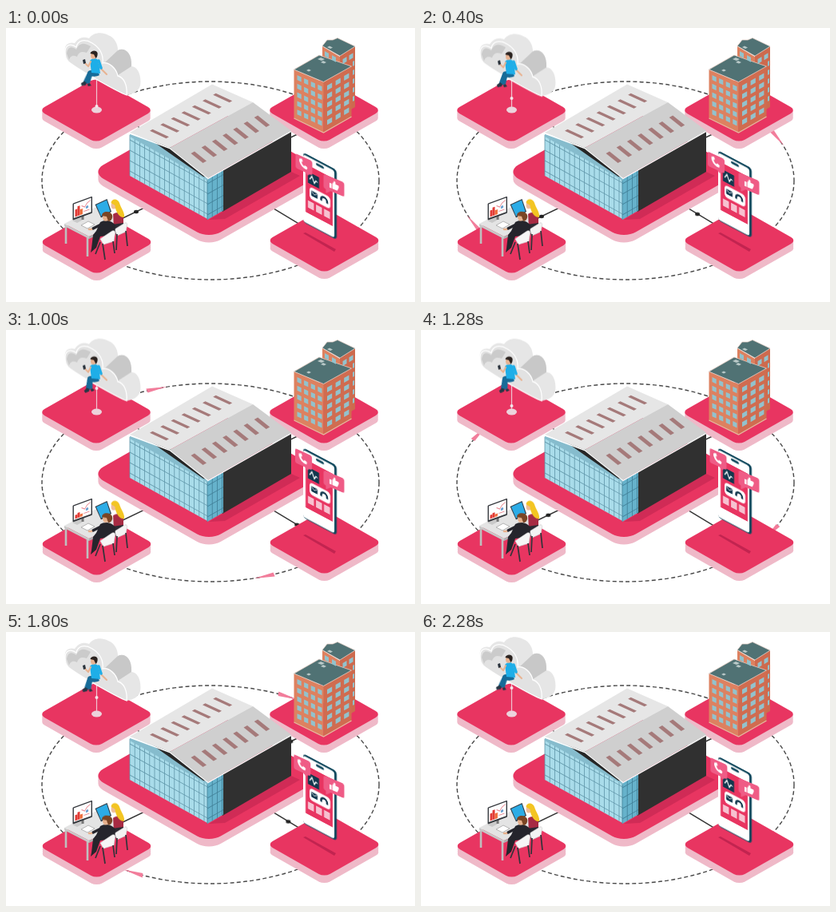
An HTML page for the animation above (2320 ms loop, 512 px wide and 343 px high).

```html
<!DOCTYPE html>
<html lang="en">
<head>
<meta charset="utf-8">
<title>Connected campus</title>
<style>
html, body { margin: 0; width: 100%; height: 100%; overflow: hidden; background: #fff; }
svg { display: block; width: 100vw; height: 100vh; }

.spark {
  fill: #f27d9b;
  offset-path: path("M467 191A211 124 0 0 0 45 191A211 124 0 0 0 467 191");
  offset-rotate: auto;
  animation: orbit 2320ms -2046ms linear infinite;
}
.spark.b { animation-delay: -886ms; }
@keyframes orbit { from { offset-distance: 0%; } to { offset-distance: 100%; } }

.bead { animation: travel 1160ms linear infinite; }
.bead.late { animation: travel 1160ms linear infinite, appear 1160ms linear infinite; }
@keyframes travel { to { transform: translate(var(--dx), var(--dy)); } }
@keyframes appear { 0%, 12% { opacity: 0; } 25%, 100% { opacity: 1; } }

.bob { animation: bob 1160ms cubic-bezier(.37, 0, .63, 1) infinite alternate; }
@keyframes bob { to { transform: translate(0, var(--dy)); } }

.sway { animation: sway 2320ms ease-in-out infinite; }
@keyframes sway {
  0%, 31%, 69%, 100% { transform: translateX(0); }
  17%, 84% { transform: translateX(-3.5px); }
  55% { transform: translateX(-1px); }
}
.shin { transform-origin: 104px 57px; animation: shin 1160ms cubic-bezier(.37, 0, .63, 1) infinite alternate; }
@keyframes shin { from { transform: rotate(5deg); } to { transform: rotate(-12deg); } }

.bars rect { transform-box: fill-box; transform-origin: 50% 100%; animation: bars 1160ms ease-in-out infinite alternate; }
@keyframes bars { to { transform: scaleY(.5); } }
</style>
</head>
<body>
<svg viewBox="0 0 512 343" preserveAspectRatio="none">
  <!-- orbit and links -->
  <ellipse cx="256" cy="191" rx="211" ry="124" fill="none" stroke="#484848" stroke-width="1.4" stroke-dasharray="5 3.2"/>
  <path class="spark" d="M-13 0L12-2.8 13 2.6z"/>
  <path class="spark b" d="M-13 0L12-2.8 13 2.6z"/>
  <path d="M113 92L398 264M113 254L398 117" stroke="#333" stroke-width="1.4"/>
  <g fill="#222">
    <ellipse class="bead" style="--dx:-35px;--dy:17px" cx="163" cy="230" rx="3" ry="2.2"/>
    <ellipse class="bead late" style="--dx:35px;--dy:21px" cx="334" cy="225.7" rx="3" ry="2.2"/>
    <ellipse class="bead late" style="--dx:35px;--dy:-17px" cx="337" cy="146.5" rx="3" ry="2.2"/>
  </g>

  <g id="pads"></g>

  <!-- hall -->
  <path d="M254 240L357 180 368 185 274 239z" fill="#d02b56"/>
  <path d="M271 178L357 129V180L271 230z" fill="#303030"/>
  <g id="glass"></g>
  <path d="M155 132L205 148 253 187 253 191 155 136z" fill="#86bccd"/>
  <path d="M184 142L205 148 253 187 247 186 211 161z" fill="#262626"/>
  <path d="M155 131L258 70.5 309 93 205 150z" fill="#e6e6e6"/>
  <path d="M205 150L309 93 357 128.5 253 188z" fill="#cfcfcf"/>
  <path d="M155 132L205 150.5 253 188.5 357 129.5" fill="none" stroke="#fff" stroke-width="1.4"/>
  <g id="slats" fill="#a57a7a"></g>

  <!-- office block -->
  <g>
    <path d="M396 23L418 36V100L396 88z" fill="#dd8160"/>
    <path d="M418 35L437 23V99L418 110z" fill="#cd6a4e"/>
    <path d="M396 22.500L402 15H409L415 12.500 437 23 418 35z" fill="#507274" stroke="#e6cfc4" stroke-width=".7"/>
    <path d="M360.500 52L397.500 68V131L360.500 113z" fill="#dd8160"/>
    <path d="M397.500 68L432.500 48V111L397.500 131z" fill="#d06c50"/>
    <path d="M360.500 52L392 34 432.500 48 397.500 67.500z" fill="#507274" stroke="#e6cfc4" stroke-width=".8"/>
    <path d="M360.500 113L397.500 131 432.500 111" fill="none" stroke="#e6b9a0" stroke-width="1.200"/>
    <path d="M390 39l4-2 5 2-4 2zM394 43l3-2 4 2-3 1.500zM402 24l3-1.500 4 2-3 1.500zM376 53l3-1.500 3 1.500-3 1.500z" fill="#b9c9c8"/>
    <g id="panes" fill="#93c2cc"></g>
  </g>

  <!-- cloud -->
  <path d="M113.500 62V102" stroke="#efc5d1" stroke-width="1.200"/>
  <ellipse cx="113.500" cy="102.500" rx="6.500" ry="4" fill="#ecd3dc"/>
  <circle class="bead" style="--dx:0px;--dy:-29px" cx="113.500" cy="98" r="2" fill="#f4e6eb"/>
  <g class="bob" style="--dy:4.800px">
    <path d="M74 30C72 20 80 17 86 19 92 10 100 11 104 13 110 5 120 5 128 9 136 12 140 20 140 28 148 24 158 30 157 48 165 48 170 60 168 72 166 80 158 83 151 84 140 80 90 52 78 42 74 38 74 34 74 30z" fill="#e6e6e6"/>
    <path d="M140 28C148 24 158 30 157 48L140 59C138 50 132 44 124 43z" fill="#c8c8c8"/>
    <path d="M74 30C74 22 80 18 88 24 90 14 100 14 108 19 118 25 122 34 121 44 128 42 138 50 140 60 148 62 152 72 151 84 140 80 90 52 78 42 74 38 74 34 74 30z" fill="#e2e2e2" stroke="#fff" stroke-width="1.300"/>
    <path d="M76 32C77 24 82 22 88 27 91 18 99 18 106 23L101 31C95 29 91 30 89 36 83 33 80 36 79 40z" fill="#cbcbcb"/>
    <!-- sitter -->
    <g class="shin">
      <path d="M103 54l6 1-3 14-4 1zM98 67l4-11 5 1-5 13-4 0z" fill="#176b98"/>
      <path d="M95 70l4-3 3 2-1 3-5 1zM103 70l3-1 2 3-4 1z" fill="#263645"/>
    </g>
    <path d="M102 56C103 52 108 52 115 54L117 59C112 62 107 60 103 60z" fill="#176b98"/>
    <path d="M105 41C108 37 113 37 116 41L118 57 107 56z" fill="#1eaee8"/>
    <path d="M106 42L103 48 99 44M116 43L120 52 126 58" fill="none" stroke="#e8b392" stroke-width="2" stroke-linecap="round" stroke-linejoin="round"/>
    <path d="M116 41L119 50" stroke="#1eaee8" stroke-width="3.500" stroke-linecap="round"/>
    <path d="M96 40l3-1 1 5-3 1z" fill="#29323c"/>
    <ellipse cx="109.500" cy="34.500" rx="3.500" ry="4.300" fill="#e8b392"/>
    <path d="M105.500 32C106 28 113 27 114.500 31 115 34 114 37 112.500 38L110 33z" fill="#2b2320"/>
  </g>

  <!-- desk -->
  <g>
    <path d="M75 247V270M102 260V286M112 250V262" stroke="#bfbfbf" stroke-width="2.600"/>
    <path d="M73 245L113 224 146 242 104 261z" fill="#e4e4e4"/>
    <path d="M73 245L104 261V264L73 248z" fill="#c8c8c8"/>
    <path d="M104 261L146 242V245L104 264z" fill="#b0b0b0"/>
    <path d="M94 247l9-5 8 4-9 5z" fill="#fff" stroke="#9a9a9a" stroke-width=".7"/>
    <path d="M83 241l9-5 6 3-9 5z" fill="#c9c9c9"/>
    <path d="M96 235v5" stroke="#777" stroke-width="3"/>
    <g transform="matrix(1 -.36 0 1 83.500 219.500)">
      <rect width="24.500" height="21" rx="1" fill="#33363b"/>
      <rect x="1.400" y="1.400" width="21.700" height="17.600" fill="#fff"/>
      <g class="bars" fill="#e23a35">
        <rect x="3" y="9" width="3" height="9"/>
        <rect x="6" y="6" width="3" height="12"/>
        <rect x="9" y="11" width="3.500" height="7" fill="#ee6a37"/>
      </g>
      <path d="M11 7l4 3 3-4 4-2M14 15h7" fill="none" stroke="#e88a94" stroke-width="1"/>
      <circle cx="18" cy="11" r="1.700" fill="#6a9fd0"/>
    </g>
    <path d="M111.500 221L126.500 214 132 230 119 237.500z" fill="#34404b"/>
    <path d="M113 221.500L126 215.500 130.500 229.500 119 235.500z" fill="#2cace6"/>
    <!-- far sitter -->
    <g class="bob" style="--dy:-.8px">
      <path d="M134 233C139 229 146 231 147 237L147 249 135 250z" fill="#a72b43"/>
      <ellipse cx="135" cy="222" rx="3.500" ry="4.500" fill="#efbd98"/>
      <path d="M131.500 219C132 213 140 213 142 219 144 226 149 231 148 237 142 238 137 230 136.500 222z" fill="#f3c522"/>
    </g>
    <path d="M133 246L147 244 147 253 138 260z" fill="#2c2a33"/>
    <path d="M136 252L149 244Q152 243 151.500 247L150 255 139 260z" fill="#f3f3f3" stroke="#d2d2d2" stroke-width=".7"/>
    <path d="M139 258l-1 20M150 254l2 19" stroke="#33333a" stroke-width="1.700"/>
    <!-- near sitter -->
    <path d="M118 243C124 239 133 241 137 247L136 259 118 261 113 275 106 281 107 276 109 259 113 254z" fill="#25252c"/>
    <path d="M119 246L109 251" stroke="#25252c" stroke-width="3.500" stroke-linecap="round"/>
    <path d="M107 252h-3" stroke="#e6b08c" stroke-width="2.500" stroke-linecap="round"/>
    <g class="bob" style="--dy:-.8px">
      <ellipse cx="125" cy="237" rx="4" ry="4.800" fill="#e6b08c"/>
      <path d="M120 235C120 229 130 228 133 234 134 239 131 242 128 242L126 236z" fill="#7a4524"/>
    </g>
    <path d="M118 264L133 254Q137 253 136.500 257L135 267 122 271z" fill="#f6f6f6" stroke="#d2d2d2" stroke-width=".7"/>
    <path d="M121 270l3 20M134 267l2 15M118 268l-6 15" stroke="#33333a" stroke-width="1.700"/>
  </g>

  <!-- phone -->
  <path d="M372 257L375 256 413 277 411 280z" fill="#c22450"/>
  <g class="bob" style="--dy:-8.500px">
    <g transform="matrix(1 .53 0 1 373 156)">
      <rect x="-1" width="42" height="87.500" rx="4" fill="#0e465b"/>
      <rect x="-1" y="2.500" width="39" height="84" rx="3" fill="#fff"/>
      <rect x="2" y="13" width="34" height="60" fill="#e83561"/>
      <rect x="15" y="4.500" width="10" height="3" rx="1.500" fill="#0e465b"/>
      <rect x="5" y="21" width="14" height="14" fill="#12384e"/>
      <path d="M7 29.500l3-5 3 7 2-4 2 1" fill="none" stroke="#fff" stroke-width="1.300"/>
      <rect x="7" y="38.500" width="26" height="15" rx="4" fill="#fff"/>
      <rect x="9" y="42.500" width="8" height="6.500" rx="1" fill="#12384e"/>
      <path d="M9.500 43.500l3.500 2.500 3.500-2.500" fill="none" stroke="#fff" stroke-width=".8"/>
      <path d="M21.500 48.500V46.500A3.700 3.700 0 0 1 29 46.500V48.500" fill="none" stroke="#12384e" stroke-width="2.400"/>
      <g fill="#f7c1d0">
        <rect x="5" y="57" width="7.500" height="9"/>
        <rect x="15" y="57" width="7.500" height="9"/>
        <rect x="25" y="57" width="7.500" height="9"/>
      </g>
    </g>
  </g>
  <g class="bob" style="--dy:-9.500px">
    <g class="sway">
      <g transform="matrix(1 .46 0 1 362.500 157)">
        <path d="M2 0H18Q21 0 21 3V16Q21 18 19 18H18L15 20.500 12 18H2Q0 18 0 16V2Q0 0 2 0z" fill="#ef5c86"/>
        <path d="M5 4C3 8 8 15 14 14L15 11 12 9.500 10.500 11C8.500 10 7.500 8.500 7.500 7L9 6 8 3z" fill="#fff"/>
      </g>
    </g>
  </g>
  <g class="bob" style="--dy:-7.500px">
    <g transform="matrix(1 .42 0 1 397.500 182.500)">
      <path d="M3 0H23Q26 0 26 3V16Q26 18 24 18H9L3 23V18Q0 18 0 15V3Q0 0 3 0z" fill="#ef5c86"/>
      <path d="M7.500 8h2.500v6H7.500zM11 8L13.500 3.500Q15.500 3.500 15 7H18.500Q19.500 8 19 9.500L17.500 13.500Q17 14 15.500 14H11z" fill="#fff"/>
    </g>
  </g>
</svg>
<script>
const fill = (id, markup) => { document.getElementById(id).innerHTML = markup; };
const times = (n, fn) => Array.from({ length: n }, (_, i) => fn(i)).join("");

// Rounded square seen isometrically: centre, side, corner radius
const tile = (x, y, size, r, color) =>
  `<rect x="${-size / 2}" y="${-size / 2}" width="${size}" height="${size}" rx="${r}" fill="${color}"` +
  ` transform="matrix(.866 .493 -.866 .493 ${x} ${y})"/>`;
const pad = ([x, y, size, r]) =>
  times(4, i => tile(x, y + 9.5 - i * 2.5, size, r, "#efb9c8")) + tile(x, y, size, r, "#e83561");
fill("pads", [
  [254, 180, 170, 17], [113, 103, 83, 8], [398, 103, 83, 8],
  [113.5, 268, 83, 8], [398.5, 266, 83, 8]
].map(pad).join(""));

// Curtain wall with mullions every `gap` pixels
const wall = (x, y, slope, w, gap, color, line) =>
  `<g transform="matrix(1 ${slope} 0 1 ${x} ${y})" stroke="${line}" stroke-width=".8">` +
  `<rect width="${w}" height="51" fill="${color}" stroke="none"/>` +
  `<path d="${times(Math.floor(w / gap) + 1, i => `M${i * gap} 0v51`)}"/>` +
  `<path d="${times(4, i => `M0 ${6 + i * 13}h${w}`)}"/></g>`;
fill("glass",
  wall(155, 134, .555, 98, 6.2, "#a9dcea", "#6096a9") +
  wall(252, 189, -.57, 20, 6.2, "#66b2cb", "#407f97"));

fill("slats", times(7, i => {
  const x = i * 13.2, y = i * 7.5;
  return `<path d="M${180 + x} ${128.8 - y}l3.500-2 20.500 9.500-3.500 2z"/>` +
    `<path d="M${231.5 + x} ${157 - y}l4.500-2.600 15 12-4.500 2.600z"/>`;
}));

const panes = (x, y, slope, cols, rows, dx, dy, w) =>
  `<g transform="matrix(1 ${slope} 0 1 ${x} ${y})">` +
  times(cols * rows, i => `<rect x="${(i % cols) * dx}" y="${Math.floor(i / cols) * dy}" width="${w}" height="6"/>`) + "</g>";
fill("panes",
  panes(364.5, 59, .46, 4, 5, 8.6, 10.8, 5.2) +
  panes(402, 72, -.57, 3, 5, 10.6, 10.8, 6.2) +
  panes(399, 29, .56, 2, 1, 9, 10, 5) +
  panes(421.5, 39, -.6, 2, 1, 8, 10, 5) +
  panes(434, 42, -.6, 1, 5, 8, 11, 2));
</script>
</body>
</html>
```
